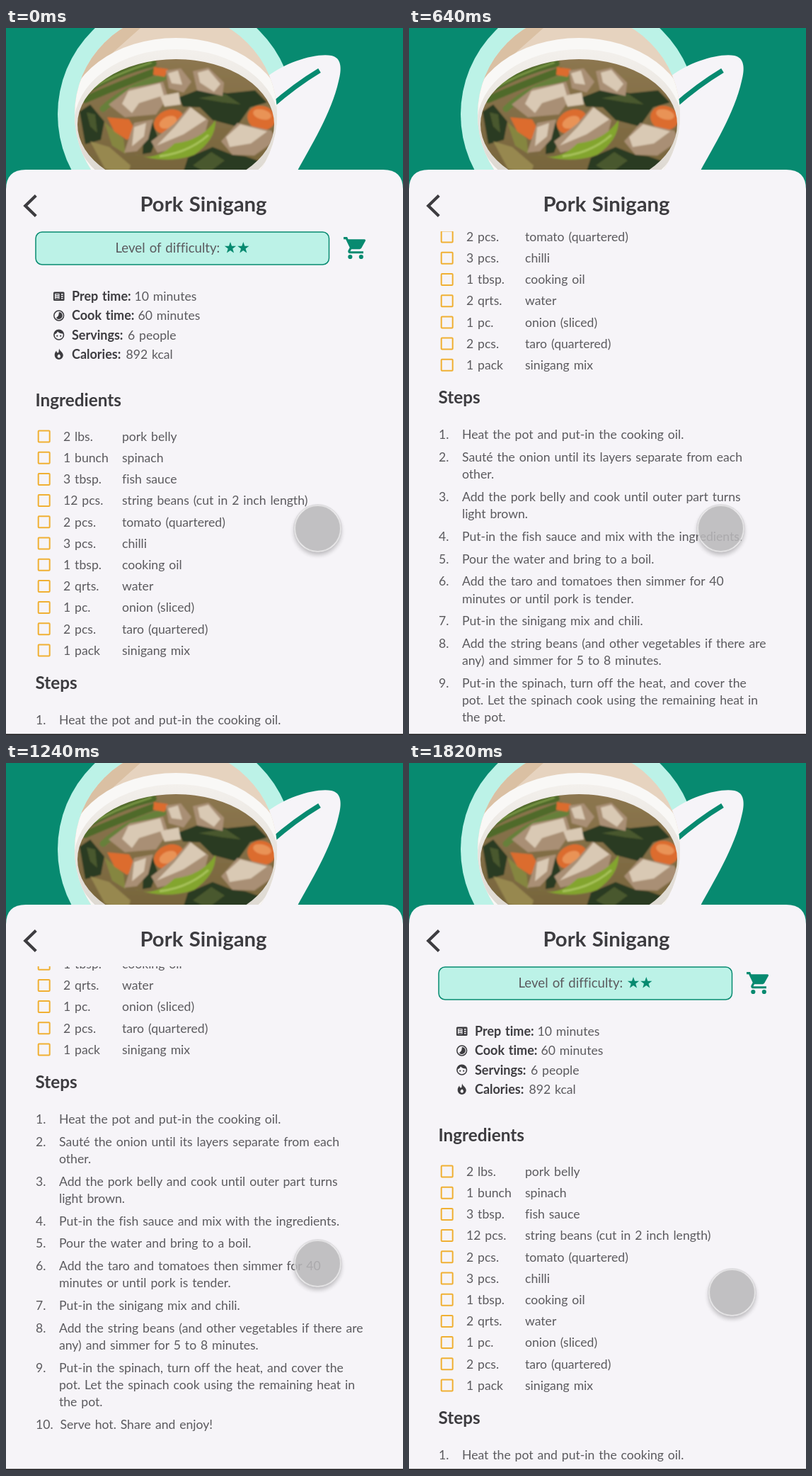
These frames come from a looping animation (561x998 px, 1850 ms). An HTML page:

```html
<!DOCTYPE html>
<html lang="en">
<head>
<meta charset="utf-8">
<title>Recipe scroll</title>
<style>
  html, body { margin: 0; width: 100%; height: 100%; overflow: hidden; background: #f6f4f8; }
  svg { display: block; }
  text {
    font: 17.6px Lato, "Open Sans", sans-serif;
    font-variant-ligatures: none;
    word-spacing: 1.4px;
    fill: #5b5a5e;
  }
  text.bold { font-size: 18px; font-weight: 700; fill: #3d3c40; }
  text.head { font-size: 24.3px; }
  text.title { font-size: 29.3px; }
  text.level { font-size: 18.6px; }
  .icon { fill: #3d3c40; }
  .box { fill: none; stroke: #f0b033; stroke-width: 2; }
  #page { animation: scroll 1850ms infinite; }
  #dot { animation: drift 1850ms infinite; }
  /* slow scroll down, rest, quick scroll back */
  @keyframes scroll {
    0%, 21.08% { transform: translateY(0); animation-timing-function: ease; }
    45.65%, 88% { transform: translateY(-474px); animation-timing-function: ease; }
    97.7%, 100% { transform: translateY(0); }
  }
  @keyframes drift {
    0%, 93.5% { transform: translate(440.5px, 706.5px); animation-timing-function: ease-in-out; }
    98.1%, 100% { transform: translate(456.5px, 747.5px); }
  }
</style>
</head>
<body>
<svg width="561" height="998" viewBox="0 0 561 998">
  <defs>
    <clipPath id="plate"><circle cx="240" cy="122" r="143"/></clipPath>
    <clipPath id="broth"><ellipse cx="240" cy="136" rx="139" ry="92"/></clipPath>
    <clipPath id="view"><rect y="287" width="561" height="710"/></clipPath>
    <linearGradient id="wall" x1="0" y1="0" x2="0" y2="1">
      <stop offset="0" stop-color="#f3f0ec"/>
      <stop offset="1" stop-color="#d9d4cc"/>
    </linearGradient>
    <linearGradient id="soup" x1="0" y1="0" x2="0" y2="1">
      <stop offset="0" stop-color="#8d7750"/>
      <stop offset="1" stop-color="#75633a"/>
    </linearGradient>
    <filter id="soft"><feGaussianBlur stdDeviation="1.3"/></filter>
    <filter id="shade" x="-30%" y="-30%" width="160%" height="170%">
      <feDropShadow dx="0" dy="4" stdDeviation="3" flood-opacity=".28"/>
    </filter>
  </defs>

  <rect width="561" height="260" fill="#078a70"/>
  <circle cx="240" cy="122" r="167" fill="#bcf2e7"/>
  <path d="M330 210L370 68C396 48 438 35 460 39C474 42 475 57 470 75C460 120 430 168 411 203Z" fill="#f6f4f8"/>
  <path d="M374 111Q408 81 443 60" fill="none" stroke="#078a70" stroke-width="7"/>

  <g clip-path="url(#plate)">
    <rect x="90" width="300" height="210" fill="#e6d3bf"/>
    <path d="M90 0H190L100 80Z" fill="#dac0a3"/>
    <ellipse cx="240" cy="130" rx="155" ry="116" fill="#f9f8f6"/>
    <ellipse cx="241" cy="136" rx="145" ry="106" fill="url(#wall)"/>
    <g clip-path="url(#broth)"><g filter="url(#soft)">
      <rect x="90" y="40" width="300" height="180" fill="url(#soup)"/>
      <g fill="none" stroke-linecap="round">
        <path d="M105 93Q155 62 208 50M112 101Q160 80 214 60" stroke="#4f6b2a" stroke-width="10"/>
        <path d="M137 114Q172 82 222 70" stroke="#66803a" stroke-width="9"/>
        <path d="M108 92Q155 64 205 49" stroke="#83a04b" stroke-width="2"/>
      </g>
      <g fill="#2b3a22">
        <path d="M104 118L119 108L139 132L134 158L112 164Z"/>
        <path d="M244 98L270 88L313 92L352 88L369 105L345 112L326 139L292 130L274 112L250 111Z"/>
        <path d="M194 154L207 133L214 153L205 176L193 178Z"/>
        <path d="M257 183L292 168L320 179L338 181L364 190L350 205H250Z"/>
      </g>
      <g fill="#48592f">
        <path d="M272 99L310 93L332 108L306 105Z"/>
        <path d="M264 194L290 175L309 187L285 205Z"/>
        <path d="M114 119L126 122L129 148L119 139Z"/>
      </g>
      <path d="M139 133L166 156L169 178L150 166Z" fill="#85863f"/>
      <path d="M119 160L146 168L176 194L172 207L140 199Z" fill="#978850"/>
      <g fill="#dc6c2e">
        <path d="M143 126L174 129L185 148L171 158L153 146Z"/>
        <ellipse cx="230" cy="132" rx="22" ry="16" transform="rotate(-25 230 132)"/>
        <ellipse cx="361" cy="127" rx="20" ry="17" transform="rotate(15 361 127)"/>
        <path d="M209 55L229 58L224 69L208 66Z"/>
      </g>
      <g fill="#e99357">
        <ellipse cx="229" cy="133" rx="13" ry="8" transform="rotate(-25 229 133)"/>
        <ellipse cx="362" cy="122" rx="13" ry="7" transform="rotate(15 362 122)"/>
      </g>
      <g fill="#a98f74">
        <path d="M145 108L175 85L222 76L229 98L212 122L168 126Z"/>
        <path d="M205 160L238 135L259 111L286 130L281 150L249 168L214 176Z"/>
        <path d="M304 160L327 134L375 145L381 159L351 180L320 179Z"/>
        <path d="M167 176L181 134L208 129L201 157L185 174Z"/>
        <path d="M226 60L247 57L262 76L251 91L230 85Z"/>
        <path d="M264 61L286 56L308 77L306 96L270 88Z"/>
      </g>
      <g fill="#d9c9b4">
        <path d="M173 89L218 78L223 95L188 106L178 120L164 107Z"/>
        <path d="M238 140L261 112L283 129L251 150L213 166Z"/>
        <path d="M311 154L331 136L369 146L346 163L316 168Z"/>
        <path d="M181 140L198 134L195 153L178 167Z"/>
        <path d="M229 64L243 60L249 80L234 78Z"/>
        <path d="M271 63L286 59L303 79L294 90L274 77Z"/>
        <path d="M218 96L244 91L247 108L224 111Z"/>
      </g>
      <path d="M181 178Q211 190 238 163Q276 159 296 130Q297 157 266 179Q228 193 181 178Z" fill="#83a52f"/>
      <path d="M217 181Q258 176 286 151" fill="none" stroke="#a9c35c" stroke-width="3"/>
    </g></g>
  </g>

  <path d="M0 998V228Q0 200 28 200H533Q561 200 561 228V998Z" fill="#f6f4f8"/>
  <path d="M42.3 236.5L27.3 251L42.3 265.5" fill="none" stroke="#3d3c40" stroke-width="4.2"/>
  <text class="bold title" x="279" y="259" text-anchor="middle">Pork Sinigang</text>

  <g clip-path="url(#view)">
    <g id="page">
      <rect x="42" y="288" width="414.5" height="46" rx="9" fill="#bcf2e7" stroke="#078a70" stroke-width="1.5"/>
      <text class="level" x="154.5" y="317">Level of difficulty:</text>
      <path fill="#078a70" transform="translate(475.5 292) scale(1.55)" d="M7 18a2 2 0 1 0 0 4a2 2 0 1 0 0-4zM1 2v2h2l3.6 7.6-1.35 2.4c-.7 1.4.3 3 1.75 3h12v-2H7.4q-.4-.1-.2-.4l.9-1.6h7.45c.75 0 1.4-.4 1.75-1l3.6-6.5A1 1 0 0 0 20 4H5.2l-.95-2zM17 18a2 2 0 1 0 0 4a2 2 0 1 0 0-4z"/>
      <g class="icon">
        <rect x="67" y="372.5" width="15.5" height="12.5" rx="1.5"/>
        <path d="M69 375h6.5v7.5H69zM78 375h2.5v1.7H78zM78 378h2.5v1.7H78zM78 381h2.5v1.5H78z" fill="#f6f4f8"/>
        <path d="M70 376.5h4.5M70 379h4.5M70 381.5h4.5" stroke="#3d3c40"/>
        <circle cx="74.7" cy="406" r="6.9" fill="none" stroke="#3d3c40" stroke-width="1.5"/>
        <path d="M74.7 401a5 5 0 1 1-3.8 8.2Q75.5 406 74.7 401Z"/>
        <circle cx="74.7" cy="433.2" r="6.8" fill="none" stroke="#3d3c40" stroke-width="1.6"/>
        <path d="M67.7 433Q71.5 432 73 428.5Q76 432 81.5 431.5Q80 426 74.7 426Q68 426 67.7 433Z"/>
        <circle cx="72.3" cy="434.7" r="1.1"/><circle cx="77.2" cy="434.7" r="1.1"/>
        <path d="M75.3 452.5C75.5 456 80.5 457 80.8 462A6 6 0 0 1 68.7 462C68.5 459 70 457 71.2 455.5Q71.5 458.5 73.3 458.5C75.5 458 74 455 75.3 452.5Z"/>
        <path d="M75 460.5Q77.8 462 76.5 465Q74.5 466.5 72.8 464.5Q72 462 75 460.5Z" fill="#f6f4f8"/>
      </g>
    </g>
  </g>

  <rect y="996.5" width="561" height="1.5" fill="#151516"/>
  <g id="dot">
    <g opacity=".86">
      <circle r="32.6" fill="#b9b7ba" stroke="#fff" stroke-width="1.4" filter="url(#shade)"/>
    </g>
    <circle r="33.5" fill="none" stroke="#b4b2b5" stroke-width=".7"/>
  </g>
</svg>
<script>
  const page = document.getElementById("page");

  function add(tag, attrs, content = "") {
    const el = document.createElementNS("http://www.w3.org/2000/svg", tag);
    for (const key in attrs) el.setAttribute(key, attrs[key]);
    el.textContent = content;
    page.append(el);
  }
  const write = (x, y, content, cls = "") => add("text", { x, y, class: cls }, content);

  function star(cx, cy, r) {
    const points = Array.from({ length: 10 }, (_, i) => {
      const a = i * Math.PI / 5, d = i % 2 ? r * 0.4 : r;
      return [cx + d * Math.sin(a), cy - d * Math.cos(a)].map(v => v.toFixed(2));
    });
    add("polygon", { points: points.join(" "), fill: "#078a70" });
  }
  star(317, 310.5, 8.6);
  star(335.3, 310.5, 8.6);

  [
    ["Prep time:", 181.5, "10 minutes"],
    ["Cook time:", 186.5, "60 minutes"],
    ["Servings:", 172, "6 people"],
    ["Calories:", 169.5, "892 kcal"]
  ].forEach(([label, x, value], i) => {
    const y = 385 + i * 27.25;
    write(93, y, label, "bold");
    write(x, y, value);
  });

  write(41.5, 534, "Ingredients", "bold head");
  [
    ["2 lbs.", "pork belly"],
    ["1 bunch", "spinach"],
    ["3 tbsp.", "fish sauce"],
    ["12 pcs.", "string beans (cut in 2 inch length)"],
    ["2 pcs.", "tomato (quartered)"],
    ["3 pcs.", "chilli"],
    ["1 tbsp.", "cooking oil"],
    ["2 qrts.", "water"],
    ["1 pc.", "onion (sliced)"],
    ["2 pcs.", "taro (quartered)"],
    ["1 pack", "sinigang mix"]
  ].forEach(([amount, item], i) => {
    const y = 582.8 + i * 30.2;
    add("rect", { x: 45.7, y: y - 14.3, width: 16, height: 16, rx: 1, class: "box" });
    write(81, y, amount);
    write(164, y, item);
  });

  write(41.5, 933, "Steps", "bold head");
  let y = 983;
  [
    ["Heat the pot and put-in the cooking oil."],
    ["Sauté the onion until its layers separate from each", "other."],
    ["Add the pork belly and cook until outer part turns", "light brown."],
    ["Put-in the fish sauce and mix with the ingredients."],
    ["Pour the water and bring to a boil."],
    ["Add the taro and tomatoes then simmer for 40", "minutes or until pork is tender."],
    ["Put-in the sinigang mix and chili."],
    ["Add the string beans (and other vegetables if there are", "any) and simmer for 5 to 8 minutes."],
    ["Put-in the spinach, turn off the heat, and cover the", "pot. Let the spinach cook using the remaining heat in", "the pot."],
    ["Serve hot. Share and enjoy!"]
  ].forEach((lines, i) => {
    write(42, y, `${i + 1}.`);
    for (const line of lines) {
      write(i === 9 ? 76.5 : 75, y, line);
      y += 24.1;
    }
    y += 7.7;
  });
</script>
</body>
</html>
```
